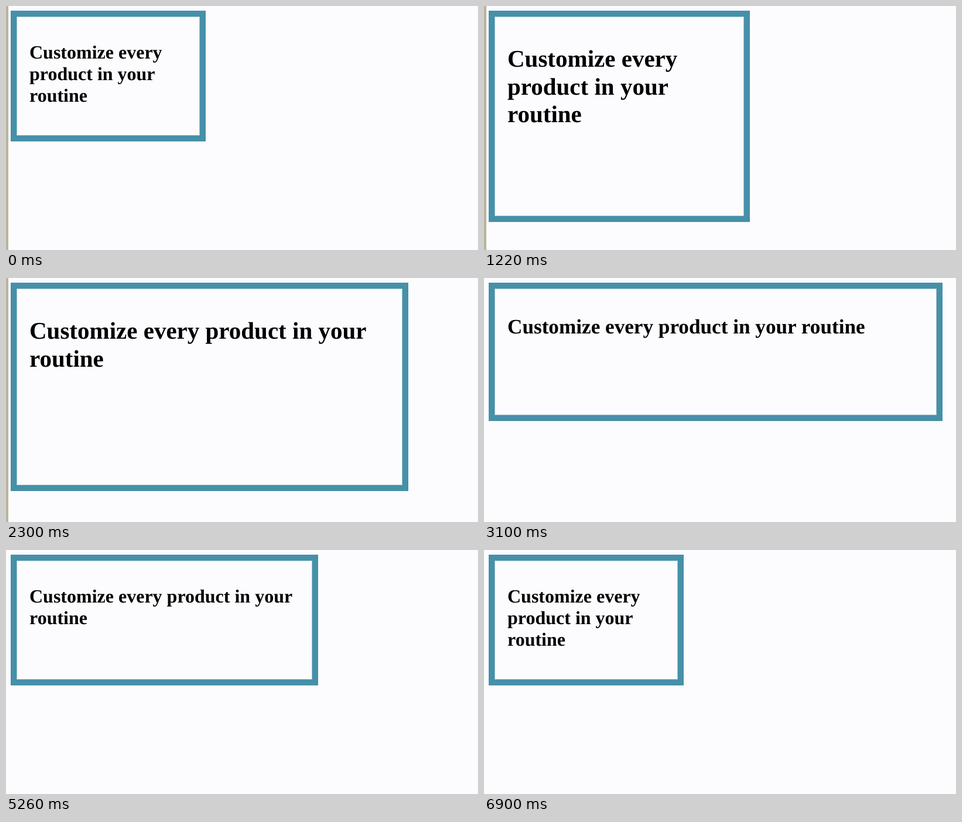
Recreate the animation shown at these times as an HTML page. Size 806 by 418 pixels, loop 6.92 s.

```html
<!DOCTYPE html>
<html lang="en">
<head>
<meta charset="utf-8">
<title>Resizing box</title>
<style>
  html, body { margin: 0; width: 100%; height: 100%; overflow: hidden; background: #fcfcfe; }
  #edge { position: absolute; left: 0; top: 0; width: 4px; height: 418px; background: #b8b49d; }
  #box {
    position: absolute; left: 8px; top: 8px; box-sizing: border-box;
    border: 10px solid #4690a8; padding: 22px;
    box-shadow: inset 0 0 0 1px rgba(70, 144, 168, .5); /* half-pixel of extra border */
  }
  h1 {
    margin: .67em 0; color: #000; text-rendering: geometricPrecision;
    font: bold 32px/1.15 "Liberation Serif", "Times New Roman", serif;
  }
</style>
</head>
<body>
<div id="edge"></div>
<div id="box"><h1 id="title">Customize every product in your routine</h1></div>
<script>
  const LOOP = 6920;
  const START = 54;         // moment the box begins to grow
  const HALF = 3373;        // time to reach full width
  const EDGE_HIDDEN = 2460;
  const MIN = { width: 333.4, height: 224, font: 32 };
  const MAX = { width: 783.5, height: 396.5, font: 41 };

  const [edge, box, title] = ["edge", "box", "title"].map(id => document.getElementById(id));
  const clamp = (v, lo, hi) => Math.min(hi, Math.max(lo, v));
  const mix = (a, b, k) => a + (b - a) * k;

  // cubic-bezier(.42, 0, .58, 1)
  function easeInOut(x) {
    let lo = 0, hi = 1;
    for (let i = 0; i < 24; i++) {
      const u = (lo + hi) / 2;
      if (u * (1.26 + u * (-0.78 + u * 0.52)) < x) lo = u; else hi = u;
    }
    return lo * lo * (3 - 2 * lo);
  }

  // Rises for one span, falls for the next, rests before and after
  function swing(t, span) {
    const p = t / span;
    if (p <= 0 || p >= 2) return 0;
    return easeInOut(p < 1 ? p : 2 - p);
  }

  function draw(time) {
    const t = time % LOOP;
    const local = t - START;
    const width = mix(MIN.width, MAX.width, swing(local, HALF));
    const height = mix(MIN.height, MAX.height, swing(local, HALF / 2));
    const font = clamp(MIN.font + (height - MIN.height) * 0.242, MIN.font, MAX.font);
    box.style.width = width.toFixed(2) + "px";
    box.style.height = height.toFixed(2) + "px";
    title.style.fontSize = font.toFixed(2) + "px";
    edge.style.display = t < EDGE_HIDDEN ? "block" : "none";
  }

  const origin = performance.now();
  function tick() {
    draw(performance.now() - origin);
    requestAnimationFrame(tick);
  }
  tick();
</script>
</body>
</html>
```
